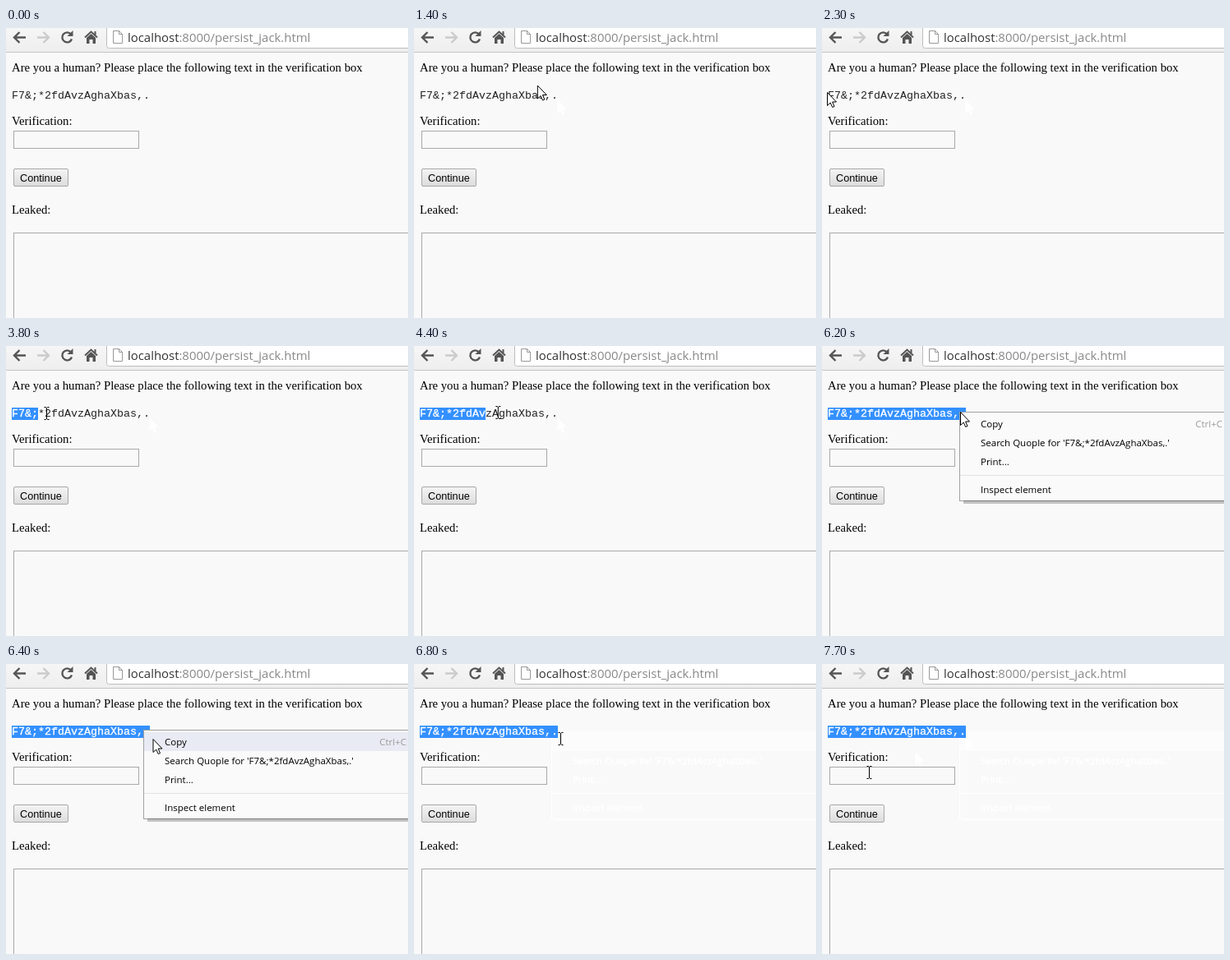
These frames come from a looping animation (489x353 px, 8 s). An HTML page:

```html
<!DOCTYPE html>
<html lang="en">
<head>
<meta charset="utf-8">
<title>Verification</title>
<style>
  html, body { margin: 0; height: 100%; overflow: hidden; background: #f9f9f9; }
  svg { display: block; width: 100%; height: 100%; }
  text { white-space: pre; }
  .serif { font: 14.73px "Liberation Serif", serif; }
  .mono { font: 13.333px "Liberation Mono", monospace; fill: #222; }
  .sans { font: 12.7px "Liberation Sans", sans-serif; }
  .url { font: 14.9px "Open Sans", sans-serif; fill: #888; }
  .host { fill: #333; }
  .menu { font: 11.5px "Open Sans", sans-serif; }
  .box { fill: none; stroke: #a9a9a9; }
  .residue { fill: #fff; stroke: #fff; stroke-width: .5; }
  #picked { fill: #fff; stroke: #fff; stroke-width: .3; }
</style>
</head>
<body>
<svg viewBox="0 0 489 353">
  <defs>
    <linearGradient id="face" x2="0" y2="1">
      <stop stop-color="#f4f4f4"/><stop offset="1" stop-color="#dcdcdc"/>
    </linearGradient>
    <linearGradient id="bar" x2="0" y2="1">
      <stop stop-color="#f6f6f6"/><stop offset="1" stop-color="#eee"/>
    </linearGradient>
    <path id="pointer" d="M.5 .5V16.5L4.2 13L6.7 18.5L9 17.5L6.6 12H11.5Z"/>
    <g id="labels">
      <text x="193" y="122">Search Quople for 'F7&amp;;*2fdAvzAghaXbas,.'</text>
      <text x="193" y="145">Print...</text>
      <text x="193" y="179">Inspect element</text>
    </g>
  </defs>

  <!-- toolbar -->
  <rect width="489" height="29" fill="url(#bar)"/>
  <path d="M0 29.5H489" stroke="#c4c4c4"/>
  <path d="M122.5 -5V21.5Q122.5 24.5 125.5 24.5H495V-5Z" fill="#fff" stroke="#bdbdbd"/>
  <g fill="none" stroke="#555" stroke-width="2.4">
    <path d="M24 11.5H10.5M16.5 5L10 11.5L16.5 18"/>
    <path d="M38 11.5H51.5M45.5 5L52 11.5L45.5 18" stroke="#cbcbcb"/>
    <path d="M79 7.5A6 6 0 1 0 80 13.5"/>
    <path d="M81.5 3V10H74.5Z" fill="#555" stroke="none"/>
    <path d="M96 11.5L103.5 4.5L111 11.5M108.5 9V4" stroke-width="2"/>
    <path d="M103.5 7L109 12V19H105.500V14H101.500V19H98V12Z" fill="#555" stroke="none"/>
  </g>
  <path d="M130.5 3.5H137.5L141.5 7.5V18.5H130.5ZM137.5 3.5V7.5H141.5" fill="#fff" stroke="#999"/>
  <text class="url" x="148" y="17"><tspan class="host">localhost</tspan>:8000/persist_jack.html</text>

  <!-- faint white traces left behind -->
  <use id="trace1" class="residue" href="#pointer" x="174" y="87"/>
  <use id="trace2" class="residue" href="#pointer" x="113" y="107"/>
  <g id="ghost" class="menu residue">
    <path d="M167 82H489V106H167Z" stroke="none" opacity=".6"/>
    <path d="M167.5 82V188.5H489M168 157.5H489M172 190.5H489" fill="none" stroke-width="1"/>
    <use href="#labels"/>
  </g>

  <!-- page -->
  <g class="serif">
    <text x="7" y="53">Are you a human? Please place the following text in the verification box</text>
    <text x="7" y="118">Verification:</text>
    <text x="7" y="226">Leaked:</text>
  </g>
  <rect id="mark" x="7" y="75" height="15" fill="#3390ff"/>
  <text class="mono" x="7" y="86"><tspan id="picked"></tspan><tspan id="rest"></tspan></text>
  <rect class="box" x="9.5" y="125.5" width="152" height="21"/>
  <rect x="9.5" y="171.5" width="66" height="21" rx="1.5" fill="url(#face)" stroke="#a8a8a8"/>
  <text class="sans" x="17" y="187">Continue</text>
  <rect class="box" x="9.5" y="249.5" width="520" height="140"/>

  <!-- context menu -->
  <g id="menu" class="menu">
    <path d="M172 190H489" stroke="#000" stroke-width="4" opacity=".22"/>
    <rect x="167.5" y="80.5" width="340" height="108" fill="#fafafa" stroke="#a0a0a0"/>
    <path d="M172 188.5H489" stroke="#7c7c7c"/>
    <rect id="hover" x="168" y="83" width="321" height="23" fill="#e8ebf3"/>
    <text x="193" y="99">Copy</text>
    <text x="487" y="99" text-anchor="end" fill="#9a9a9a">Ctrl+C</text>
    <path d="M168 157.5H489" stroke="#e4e4e4"/>
    <use href="#labels"/>
  </g>

  <g id="cursor">
    <use id="arrow" href="#pointer" fill="#fff" stroke="#000"/>
    <path id="beam" d="M-3 -7.5H-1L0 -6.5L1 -7.5H3M0 -7V7M-3 7.5H-1L0 6.5L1 7.5H3" fill="none" stroke="#000"/>
  </g>
</svg>
<script>
  const LOOP = 8000, STEP = 100, CHAR = 8, LEFT = 7;
  const code = "F7&;*2fdAvzAghaXbas,.";
  const $ = id => document.getElementById(id);
  const show = (id, on) => $(id).style.display = on ? "" : "none";

  // Straight glides from the last place; lift bows the path upwards.
  const enter = { x: 505, y: 25 };
  const glides = [
    { from: 800, to: 1200, x: 174, y: 87 },
    { from: 1300, to: 2000, x: 5, y: 74, lift: 36 },
    { from: 2200, to: 2300, x: 6, y: 78 },
    { from: 2400, to: 2600, x: 7, y: 79 },
    { from: 3000, to: 3100, x: 10.5, y: 81 },
    { from: 3500, to: 3800, x: 49.5, y: 82 },
    { from: 3800, to: 3900, x: 65.5, y: 81 },
    { from: 4100, to: 5000, x: 176, y: 81 },
    { from: 5000, to: 5100, x: 177.5, y: 81 },
    { from: 5400, to: 5700, x: 170.5, y: 81 },
    { from: 5800, to: 5900, x: 168, y: 80 },
    { from: 6200, to: 6400, x: 178.5, y: 91 },
    { from: 6800, to: 7100, x: 66.5, y: 130 },
    { from: 7200, to: 7700, x: 57.5, y: 132 }
  ];

  function position(t) {
    let { x, y } = enter;
    for (const g of glides) {
      const p = Math.min(1, Math.max(0, (t - g.from) / (g.to - g.from)));
      x += (g.x - x) * p;
      y += (g.y - y) * p - (g.lift || 0) * Math.sin(Math.PI * p);
    }
    return { x, y };
  }

  // The highlight follows one step behind the cursor.
  function selected(t) {
    if (t < 3600) return 0;
    const { x } = position(Math.min(t, 5100) - STEP);
    return Math.min(code.length, Math.round((x - LEFT) / CHAR));
  }

  function draw(now) {
    const t = Math.floor(now % LOOP / STEP) * STEP;
    const { x, y } = position(t);
    $("cursor").setAttribute("transform", `translate(${x} ${y})`);
    show("cursor", t >= 900);

    const beam = t >= 3100 && t < 5900 || t >= 6700 && t < 6900 || t >= 7100;
    show("beam", beam);
    show("arrow", !beam);

    const n = selected(t);
    $("mark").setAttribute("width", n * CHAR);
    $("picked").textContent = code.slice(0, n);
    $("rest").textContent = code.slice(n);

    show("menu", t >= 5900 && t < 6800);
    show("hover", t >= 6300);
    show("ghost", t >= 6800);
    show("trace1", t >= 1400);
    show("trace2", t >= 7100);
    requestAnimationFrame(draw);
  }
  requestAnimationFrame(draw);
</script>
</body>
</html>
```
